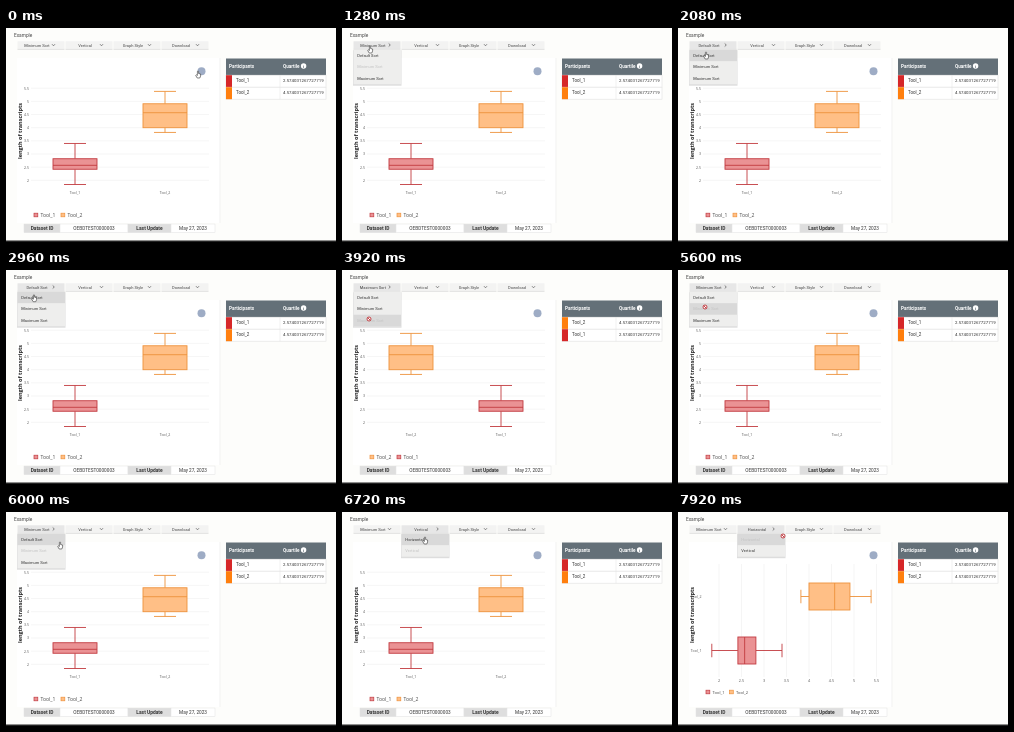
Animation, 330 px wide and 214 px high, one loop 8000 ms. Source, as an HTML page:

```html
<!DOCTYPE html>
<html lang="en">
<head>
<meta charset="utf-8">
<title>Box plot sorting</title>
<style>
html, body { margin: 0; width: 100%; height: 100%; overflow: hidden; background: #fdfdfb; }
svg { display: block; width: 330px; height: 214px; font-family: Roboto, sans-serif; }
.plot { font-family: "Open Sans", sans-serif; }
</style>
</head>
<body>
<svg id="stage" viewBox="0 0 330 214"></svg>
<script>
const stage = document.getElementById('stage');
const LOOP = 8000, STEP = 80;
const SORTS = ['Default Sort', 'Minimum Sort', 'Maximum Sort'];
const VIEWS = ['Horizontal', 'Vertical'];
const ROW = 11.5, MENU_TOP = 21.7;

// Values: lower whisker, q1, median, q3, upper whisker
const tools = [
  { name: 'Tool_1', color: '#d62728', edge: '#c23b40', fill: '#ea9294', value: '2.574031267727719', stats: [1.84, 2.42, 2.57, 2.82, 3.4] },
  { name: 'Tool_2', color: '#ff7f0e', edge: '#ee923c', fill: '#ffbf86', value: '4.574031267727719', stats: [3.82, 4, 4.57, 4.91, 5.38] }
];

// Pointer path: time, x, y
const path = [
  [0, 192, 43], [160, 182, 79], [560, 182, 79], [960, 28, 18], [1600, 28, 18],
  [1920, 28, 24], [2880, 28, 24], [3680, 27, 49], [4800, 27, 49], [4960, 27, 45.5],
  [5040, 27, 43], [5200, 27, 43], [5360, 27, 37], [5840, 27, 37], [6000, 54, 30],
  [6320, 83, 17], [6480, 83, 17], [6640, 83, 25], [7600, 83, 25], [7920, 105, 24]
];

const ease = p => p * p * (3 - 2 * p);

function pointerAt(t) {
  const i = path.findIndex(p => p[0] > t);
  if (i < 0) return path.at(-1).slice(1);
  const [a, b] = [path[i - 1], path[i]];
  const p = ease((t - a[0]) / (b[0] - a[0]));
  return [a[1] + (b[1] - a[1]) * p, a[2] + (b[2] - a[2]) * p];
}

function stateAt(t) {
  return {
    sort: t < 2000 ? 1 : t < 3840 ? 0 : t < 5600 ? 2 : 1,
    view: t < 6960 ? 1 : 0,
    open: t >= 1120 && t < 6160 ? 0 : t >= 6400 ? 1 : -1,
    pointer: pointerAt(t)
  };
}

const rect = (x, y, w, h, fill, more = '') =>
  `<rect x="${x}" y="${y}" width="${w}" height="${h}" fill="${fill}" ${more}/>`;
const line = (x1, y1, x2, y2, color, width = 1) =>
  `<path d="M${x1} ${y1}L${x2} ${y2}" stroke="${color}" stroke-width="${width}"/>`;
const text = (x, y, str, size, fill = '#444', more = '') =>
  `<text x="${x}" y="${y}" font-size="${size}" fill="${fill}" ${more}>${str}</text>`;
const middle = 'text-anchor="middle"', bold = 'font-weight="700"';

function buttons({ sort, view, open }) {
  return [SORTS[sort], VIEWS[view], 'Graph Style', 'Download'].map((label, i) => {
    const x = 11.5 + 48 * i;
    const turn = i === open ? -90 : 0;
    return rect(x, 13.3, 47, 8, i === open ? '#e7e7e7' : '#f3f3f2') +
      line(x, 21.4, x + 47, 21.4, '#d2d2d2', .6) +
      text(x + 19.5, 18.5, label, 4, '#444', middle) +
      `<path transform="translate(${x + 36} 17) rotate(${turn})" d="M-1.5 -.8L0 .8L1.5 -.8" fill="none" stroke="#555" stroke-width=".7"/>`;
  }).join('');
}

function menu({ sort, view, open, pointer: [px, py] }) {
  if (open < 0) return '';
  const items = open ? VIEWS : SORTS, x = 11.5 + 48 * open;
  const chosen = open ? view : sort || -1;
  const hover = px < x + 48 ? Math.floor((py - MENU_TOP) / ROW) : -1;
  const height = ROW * items.length;
  return rect(x - .5, MENU_TOP + .5, 48.5, height + 1, '#bbb', 'opacity=".5"') +
    rect(x, MENU_TOP, 47.5, height, '#eeeeed') +
    items.map((label, i) => {
      const y = MENU_TOP + ROW * i;
      return (i === hover ? rect(x, y, 47.5, ROW, '#d9d9d9') : '') +
        text(x + 3.8, y + 7.2, label, 4, i === chosen ? '#c3c3c3' : '#333');
    }).join('');
}

function boxPlot(tool, center, vertical) {
  const at = v => vertical ? 152.3 - 26.3 * (v - 2) : 41 + 45 * (v - 2);
  const [low, q1, mid, q3, high] = tool.stats.map(at);
  const half = vertical ? 22 : 13.5, cap = half / 2;
  const seg = (a, c, b, d) => vertical ? line(c, a, d, b, tool.edge, .9) : line(a, c, b, d, tool.edge, .9);
  const start = Math.min(q1, q3), span = Math.abs(q3 - q1);
  const frame = `stroke="${tool.edge}" stroke-width=".9"`;
  return seg(low, center, q1, center) + seg(q3, center, high, center) +
    seg(low, center - cap, low, center + cap) + seg(high, center - cap, high, center + cap) +
    (vertical ? rect(center - half, start, 2 * half, span, tool.fill, frame)
              : rect(start, center - half, span, 2 * half, tool.fill, frame)) +
    seg(mid, center - half, mid, center + half);
}

function chart(order, vertical) {
  let out = rect(11, 30, 203, 165, '#fff') + line(214, 30, 214, 195, '#ececec', .7);
  for (let v = 2; v <= 5.5; v += .5) {
    if (vertical) {
      const y = 152.3 - 26.3 * (v - 2);
      out += line(25, y, 203, y, '#eeeeee', .6) + text(23, y + 1.4, v, 3.6, '#555', 'text-anchor="end"');
    } else {
      const x = 41 + 45 * (v - 2);
      out += line(x, 52, x, 165, '#eeeeee', .6) + text(x, 170, v, 3.8, '#555', middle);
    }
  }
  order.forEach((tool, i) => {
    const center = vertical ? 69 + 90 * i : 138.5 - 54 * i;
    out += boxPlot(tool, center, vertical) + (vertical
      ? text(center, 166, tool.name, 3.6, '#555', middle)
      : text(23.5, center + 1.3, tool.name, 3.6, '#555', 'text-anchor="end"'));
    const x = 28 + i * (vertical ? 27 : 23.5), y = vertical ? 187 : 180;
    out += rect(x, y - 1.8, 3.8, 3.6, tool.fill, `stroke="${tool.edge}" stroke-width=".7"`) +
      text(x + 6.5, y + 1.8, tool.name, vertical ? 5 : 4.1, '#444');
  });
  return `<g class="plot">${out}` +
    text(0, 0, 'length of transcripts', 5.5, '#222', `${middle} ${bold} transform="translate(15.5 103) rotate(-90)"`) +
    '</g><circle cx="195.5" cy="43.3" r="4" fill="#9eacc5"/>';
}

function table(order) {
  return rect(220, 30.5, 100, 16.7, '#647078') +
    text(223, 40.2, 'Participants', 4.6, '#fff', bold) +
    text(277, 40.2, 'Quartile', 4.6, '#fff', bold) +
    '<circle cx="297.6" cy="38" r="2.7" fill="#fff"/>' +
    text(297.6, 39.7, 'i', 4.4, '#647078', `${middle} ${bold}`) +
    order.map((tool, i) => {
      const y = 47.2 + 12 * i;
      return rect(220, y, 100, 12, '#fff', 'stroke="#e2e2e2" stroke-width=".6"') +
        rect(220, y, 6, 12, tool.color) + line(274, y, 274, y + 12, '#e2e2e2', .5) +
        text(230, y + 7.2, tool.name, 4.5, '#333') + text(277, y + 7.2, tool.value, 4.4, '#333');
    }).join('');
}

function footer() {
  const cell = (x, w, label, head) =>
    rect(x, 196, w, 8.6, head ? '#dedede' : '#fff', 'stroke="#e2e2e2" stroke-width=".5"') +
    text(x + w / 2, 202.1, label, head ? 4.9 : 4.7, '#333', middle + (head ? ' ' + bold : ''));
  return cell(18, 36, 'Dataset ID', true) + cell(54, 68, 'OEBDTEST0000003') +
    cell(122, 43, 'Last Update', true) + cell(165, 44, 'May 27, 2023') +
    rect(0, 212.5, 330, 1.5, '#222');
}

function pointer({ sort, view, open, pointer: [x, y] }) {
  const row = Math.floor((y - MENU_TOP) / ROW);
  const blocked = open === 0 ? sort > 0 && row === sort : open === 1 && row === view;
  if (blocked) {
    return `<g transform="translate(${x} ${y})" fill="#fff" stroke="#bd3035" stroke-width=".9">
      <circle r="2"/><path d="M-1.3 -1.3L1.3 1.3"/></g>`;
  }
  const shape = y < 55
    ? 'M-.6 .3Q0 -.5 .6 .3V2.5L2.6 3V5L1.8 7H-.8L-2.3 4.4L-1.6 3.8L-.6 4.5Z'
    : 'M0 0V5.4L1.3 4.2L2.3 6.2L3.1 5.8L2.2 3.9H4Z';
  return `<path transform="translate(${x} ${y})" d="${shape}" fill="#fff" stroke="#333" stroke-width=".6"/>`;
}

function draw(t) {
  const state = stateAt(t);
  const order = state.sort === 2 ? [tools[1], tools[0]] : tools;
  stage.innerHTML = rect(0, 0, 330, 214, '#fdfdfb') + text(8, 8.6, 'Example', 4.8, '#444') +
    chart(order, state.view === 1) + table(order) + footer() +
    buttons(state) + menu(state) + pointer(state);
}

let shown = -1;
const began = performance.now();
function tick(now) {
  const t = Math.floor((Math.max(0, now - began) % LOOP) / STEP) * STEP;
  if (t !== shown) draw(shown = t);
  requestAnimationFrame(tick);
}
tick(began);
</script>
</body>
</html>
```
